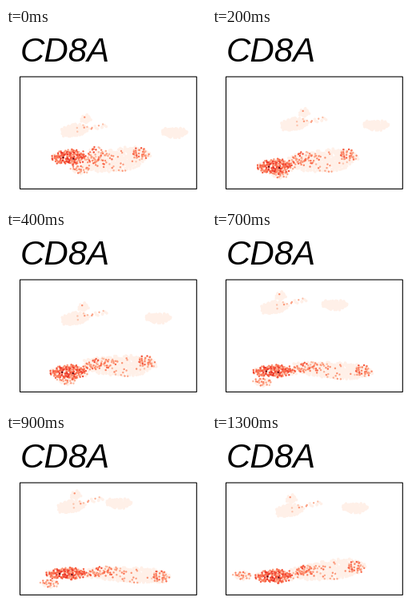
A matplotlib script that plays this animation: 250x219 px, repeating every 1.5 s.

```python
import numpy as np
import matplotlib.pyplot as plt
from matplotlib.animation import FuncAnimation
from matplotlib.patches import Rectangle

W, H, DPI = 250, 219, 100
PX = 72 / DPI
FRAMES = 15
STEPS = (0, 1, 2, 4, 5, 7, 9, 11, 13)  # ticks at which the view jumps
PALE = 0.035
rng = np.random.default_rng(8)


class Cloud:
    """Elliptic cloud of cells; a share of them is coloured by expression."""

    def __init__(self, n, share=0, heat=(0.2, 0.45), fuzz=0.06):
        k = np.arange(n)
        r = np.sqrt((k + 0.5) / n)
        a = k * np.pi * (3 - np.sqrt(5))
        r *= 1 + 0.07 * np.sin(3 * a + n) + 0.06 * np.cos(5 * a)
        self.u = r * np.cos(a) + rng.normal(0, fuzz, n)
        self.v = r * np.sin(a) + rng.normal(0, fuzz, n)
        lo, hi = heat
        hot = lo + (hi - lo) * rng.beta(1.6, 1.8, n)
        self.value = np.where(rng.random(n) < share, hot, PALE)

    def place(self, cx, cy, w, h, tilt=0):
        x, y = self.u * w, self.v * h
        c, s = np.cos(tilt), np.sin(tilt)
        return np.column_stack([cx + x * c - y * s, cy + x * s + y * c])


body = Cloud(450, 0.07, (0.2, 0.5))
bcell = Cloud(110)
mono = Cloud(120, 0.05)
neck = Cloud(24, 0.05)
trail = Cloud(11, 0.55)
tail = Cloud(42, 0.45, (0.2, 0.5), 0.1)
bridge = Cloud(95, 0.6, (0.2, 0.6), 0.12)
right = Cloud(70, 0.55, (0.2, 0.6), 0.12)
killer = Cloud(270, 0.76, (0.25, 0.68), 0.12)
killer.value[[30, 58]] = 1

clouds = [body, bcell, mono, neck, trail, tail, bridge, right, killer]
value = np.concatenate([c.value for c in clouds])
order = np.argsort(value, kind="stable")


def cells(t):
    """Positions of all cells for the view at tick t."""
    turn = np.exp(-((t - 9) / 4.6) ** 2)
    lift = np.sin(np.pi * t / 20) ** 1.35
    settle = 1 - np.exp(-t / 2)
    arc = np.sin(np.pi * t / 13)
    sway = (4 - t) * np.exp(-((t - 4) / 1.6) ** 2)

    mx = 86 - 18 * turn + 1.5 * t + 38 * sway
    my = 128 - 38 * lift
    lean = 0.12 * np.sin(2 * np.pi * (t - 2.5) / 18) - 0.05
    parts = [
        body.place(137 + 16 * turn, 165 + 11 * turn, 41 + 8 * turn, 14 - 5 * turn, lean),
        bcell.place(212 - 71 * turn, 131 - 45 * lift, 16, 6),
        mono.place(mx, my, 17, 7.5, -0.15),
        neck.place(mx + 14 - 0.9 * t, my - 14, 6, 5),
        trail.place(mx + 30, my - 4 - 4 * lift, 12, 3, -0.15),
        tail.place(93 - 4.2 * t, 177 + 12 * arc, 11, 5),
        bridge.place(113 + 6 * turn, 162 + 11 * lift, 13 + 8 * arc, 12 - 6 * settle, -0.15),
        right.place(167 + 26 * turn, 157 + 22 * turn, 10, 7),
        killer.place(79 - 3 * turn, 162 + 19 * settle - 6 * turn, 20 + 4 * turn, 8.5 - 2 * turn),
    ]
    return np.vstack(parts)[order]


fig = plt.figure(figsize=(W / DPI, H / DPI), dpi=DPI, facecolor="white")
ax = fig.add_axes([0, 0, 1, 1])
ax.set(xlim=(0, W), ylim=(H, 0))
ax.axis("off")

ax.text(18, 41.5, "CD8A", family="Liberation Sans", style="italic",
        size=42 * PX, va="baseline")
ax.add_patch(Rectangle((17.5, 61), 220.8, 140.4, fill=False, ec="black",
                       lw=1.1 * PX, snap=False))

size = np.where(value[order] > PALE, 2.4, 3.6) * PX
dots = ax.scatter(*cells(0).T, s=size ** 2, linewidths=0,
                  c=plt.get_cmap("Reds")(value[order]))


def update(i):
    dots.set_offsets(cells(max(s for s in STEPS if s <= i)))
    return dots,


anim = FuncAnimation(fig, update, frames=FRAMES, interval=100,
                     repeat=True, repeat_delay=0)
plt.show()
```
